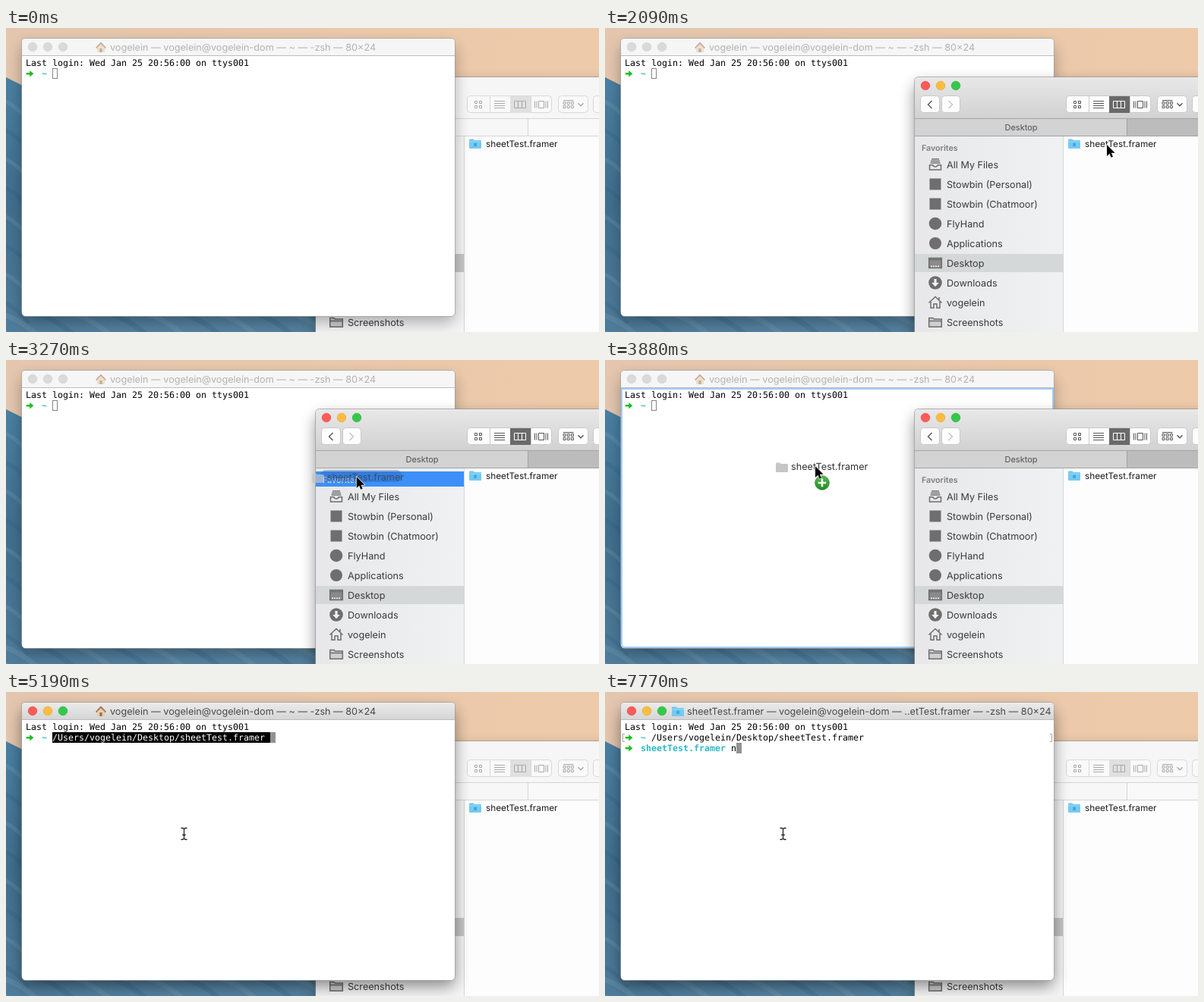
Animation of 781 by 401 pixels, one loop 8000 ms. Source, as an HTML page:

```html
<!DOCTYPE html>
<html lang="en">
<head>
<meta charset="utf-8">
<title>Drag a folder into the terminal</title>
<style>
html, body { margin: 0; width: 100%; height: 100%; overflow: hidden; background: #e8caaf; }
svg { display: block; width: 100vw; height: 100vh; }
text { font-family: Inter, Roboto, sans-serif; font-size: 12.65px; white-space: pre; text-rendering: geometricPrecision; }
.mono { font-family: "DejaVu Sans Mono", "Liberation Mono", monospace; font-size: 11.63px; }
.bold { font-weight: 700; }
.file { font-size: 11.8px; fill: #1c1c1c; }
.shadow { opacity: .3; }
.on > .shadow { opacity: .44; }

#term .bar { fill: #f6f6f6; }
#term.on .bar { fill: url(#barOn); }
#term .title { fill: #b2b2b2; }
#term.on .title { fill: #484848; }
#term .icon { opacity: .55; }
#term.on .icon { opacity: 1; }
#term .light { fill: #dadada; stroke: #cbcbcb; }
.light { stroke-width: .6; }
#term.on .red, #finder .red { fill: #fc5b57; stroke: #e24640; }
#term.on .yellow, #finder .yellow { fill: #fdbd3f; stroke: #dfa023; }
#term.on .green, #finder .green { fill: #34c84a; stroke: #1dad2c; }

#finder .bar { fill: #f6f6f6; }
#finder.on .bar { fill: url(#toolOn); }
#finder .tab { fill: #f7f7f7; }
#finder.on .tab { fill: #d3d3d3; }
#finder .tab2 { fill: #f9f9f9; }
#finder.on .tab2 { fill: #bcbcbc; }
#finder .rule { stroke: #d4d4d4; }
#finder.on .rule { stroke: #a3a3a3; }
#finder .side { fill: #f4f4f4; }
#finder.on .side { fill: url(#sideOn); }
#finder .picked { fill: #c6c6c6; }
#finder.on .picked { fill: #d5d8d8; }
#finder .btn { fill: #f9f9f9; stroke: #d9d9d9; }
#finder.on .btn { fill: #fdfdfd; stroke: #c9c9c9; }
#finder .seg { fill: #e0e0e0; }
#finder.on .seg { fill: #6a6a6a; }
#finder .tool { stroke: #a9a9a9; }
#finder.on .tool { stroke: #555; }
#finder.on .seg + .tool { stroke: #fff; }
.tool, .line { fill: none; }
.side-text { fill: #3a3a3a; }
.line { stroke: #6e6e6e; stroke-width: 1.5; }
.solid { fill: #6e6e6e; }
</style>
</head>
<body>
<svg id="stage" viewBox="0 0 781 401" xmlns="http://www.w3.org/2000/svg">
  <defs>
    <linearGradient id="sky" x2="1"><stop stop-color="#e3c6ae"/><stop offset="1" stop-color="#edcaa9"/></linearGradient>
    <linearGradient id="hill" x2=".5" y2="1"><stop stop-color="#4a80a2"/><stop offset=".4" stop-color="#416f8e"/><stop offset="1" stop-color="#5582a0"/></linearGradient>
    <linearGradient id="barOn" x2="0" y2="1"><stop stop-color="#ebebeb"/><stop offset="1" stop-color="#d4d4d4"/></linearGradient>
    <linearGradient id="toolOn" x2="0" y2="1"><stop stop-color="#e9e8e9"/><stop offset="1" stop-color="#d2d1d2"/></linearGradient>
    <linearGradient id="sideOn"><stop stop-color="#e8e8ea"/><stop offset="1" stop-color="#eff1f2"/></linearGradient>
    <linearGradient id="badgeFill" x2="0" y2="1"><stop stop-color="#58bd52"/><stop offset="1" stop-color="#1c8f1e"/></linearGradient>
    <filter id="blur" x="-20%" y="-20%" width="140%" height="140%"><feGaussianBlur stdDeviation="10"/></filter>
  </defs>
  <g id="wall"></g>
  <g id="windows"><g id="finder"></g><g id="term"></g></g>
  <g id="drag"></g>
  <g id="badge"></g>
  <path id="arrow" d="M1 1V16L4.4 12.8 6.6 17.8 9 16.8 6.8 11.8H11.6Z" fill="#000" stroke="#fff" stroke-width="1.4" stroke-linejoin="round" paint-order="stroke"/>
  <g id="beam" transform="translate(234.5 187)" fill="none" stroke-linecap="round"></g>
</svg>
<script>
const LOOP = 8000;
const USER = 'vogelein', HOST = USER + '@' + USER + '-dom';
const FILE = 'sheetTest.framer';
const PATH = `/Users/${USER}/Desktop/${FILE}`;
const $ = id => document.getElementById(id);

const rect = (x, y, w, h, attrs = '') => `<rect x="${x}" y="${y}" width="${w}" height="${h}" ${attrs}/>`;
const path = (d, attrs = '') => `<path d="${d}" ${attrs}/>`;
const circle = (x, y, r, attrs = '') => `<circle cx="${x}" cy="${y}" r="${r}" ${attrs}/>`;
const text = (x, y, s, attrs = '') => `<text x="${x}" y="${y}" ${attrs}>${s}</text>`;
const at = (x, y, s) => `<g transform="translate(${x} ${y})">${s}</g>`;
const lights = (x, y) => ['red', 'yellow', 'green'].map((c, i) => circle(x + 20 * i, y, 5.8, `class="light ${c}"`)).join('');
const folder = (x, y, fill, mark = '') => at(x, y,
  path('M0 1.5Q0 .5 1 .5H5.5L7 2H15Q16 2 16 3V12Q16 13 15 13H1Q0 13 0 12Z', `fill="${fill}"`) + mark);
const blueFolder = (x, y) => folder(x, y, '#74caf1', path('M0 4H16', 'stroke="#93d9f7"') + rect(6.3, 5.6, 3.6, 4.4, 'fill="#41a5dc"'));

// Terminal grid: 7 by 14 px cells
const colX = c => 26 + 7 * c;
const rowY = r => 39 + 14 * r;
const mono = (c, r, s, fill = '#000', cls = '') => text(colX(c), rowY(r) + 11, s, `class="mono ${cls}" fill="${fill}"`);
const GREEN = '#22bd22', CYAN = '#2fb9c8';
const prompt = (r, dir) => at(26, rowY(r) + 7.2,
  path('M.8 -1.2H5.2V-4.2L10.4 0 5.2 4.2V1.2H.8Z', `fill="${GREEN}"`)) + mono(3, r, dir, CYAN, 'bold');

function drawWall() {
  let s = rect(0, 0, 781, 401, 'fill="url(#sky)"');
  s += path('M0 65L24 77 90 120 420 300V401H0Z', 'fill="url(#hill)"');
  for (let i = 0; i < 9; i++) {
    const y = 95 + 38 * i, tone = i % 2 ? '#2d5d80' : '#7ba2b8';
    s += path(`M-5 ${y}Q12 ${y + 6} 30 ${y + 28}`, `fill="none" stroke="${tone}" stroke-width="5" opacity=".25"`);
    s += path(`M${i * 48 - 10} 376Q${i * 48 + 18} 384 ${i * 48 + 40} 404`, `fill="none" stroke="${tone}" stroke-width="7" opacity=".25"`);
  }
  $('wall').innerHTML = s;
}

function drawTerm() {
  const house = path('M118 26L125 18.5 132 26 130.5 27.2 125 21.5 119.5 27.2Z', 'fill="#a8694a"')
    + path('M120 26L125 21.3 130 26V32H120Z', 'fill="#e2cfae"') + rect(123.4, 27, 3.2, 5, 'fill="#9a7048"');
  const box = 'M21 37V19Q21 14 26 14H586Q591 14 591 19V37Z';
  $('term').innerHTML =
    rect(21, 24, 570, 364, 'rx="8" class="shadow" filter="url(#blur)"')
    + rect(20.5, 13.5, 571, 367, 'rx="5.5" fill="#fff" stroke="#000" stroke-opacity=".24"')
    + path(box, 'class="bar"') + path('M21 36.5H591', 'stroke="#bcbcbc"')
    + lights(35, 25)
    + `<g id="homeTitle"><g class="icon">${house}</g>${text(137, 30, `${USER} — ${HOST} — ~ — -zsh — 80×24`, 'class="title"')}</g>`
    + `<g id="dirTitle"><g class="icon">${blueFolder(88, 19)}</g>${text(108, 30, `${FILE} — ${HOST} — ..etTest.framer — -zsh — 80×24`, 'class="title"')}</g>`
    + mono(0, 0, 'Last login: Wed Jan 25 20:56:00 on ttys001') + prompt(1, '~')
    + `<g id="pasted">${rect(61, 53, 287, 14)}${mono(5, 1, PATH, '#fff')}</g>`
    + `<g id="ran">${mono(5, 1, PATH)}${path('M26 55.5H23.5V65.5H26M586 55.5H588.5V65.5H586', 'fill="none" stroke="#a5a5a5"')}</g>`
    + `<g id="block">${rect(.5, .5, 6, 13)}</g>`
    + `<g id="next">${prompt(2, FILE)}</g><g id="typed">${mono(20, 2, 'n')}</g>`
    + path('M22 38H590V375Q590 379 586 379H26Q22 379 22 375Z', 'id="dropRing" fill="none" stroke="#a3ccf6" stroke-width="2"');
}

const icons = [
  path('M-5 -7H5M-6 -4.5H6M-6.5 -2H6.5', 'class="line"') + path('M-7.5 .8H-3.2Q-2.5 3 0 3T3.2 .8H7.5V7H-7.5Z', 'class="line"'),
  rect(-7.5, -7.5, 15, 15, 'class="solid"'),
  rect(-7.5, -7.5, 15, 15, 'class="solid"'),
  circle(0, 0, 8.3, 'class="solid"'),
  circle(0, 0, 8, 'class="solid"'),
  rect(-8.3, -6.5, 16.6, 13, 'class="line" style="fill:#8a8a8a"') + path('M-8 -4.5H8', 'class="line"') + path('M-6 4.4H6', 'stroke="#eee" stroke-width="1.6" stroke-dasharray="2 1"'),
  circle(0, 0, 8.8, 'class="solid"') + path('M-1.6 -5H1.6V0H4.8L0 5.2 -4.8 0H-1.6Z', 'fill="#f2f2f2"'),
  path('M-8.5 .5L0 -7.5 8.5 .5M-6 -1V7.2H-2V2H2V7.2H6V-1M5 -7V-3.5', 'class="line"'),
  path('M-8.3 -5.5H-3L-1.5 -4H8.3V6.3H-8.3ZM-8.3 -1.5H8.3', 'class="line" style="fill:#cfcfcf"')
];
const places = ['All My Files', 'Stowbin (Personal)', 'Stowbin (Chatmoor)', 'FlyHand', 'Applications', 'Desktop', 'Downloads', USER, 'Screenshots'];

function drawFinder() {
  const tool = (x, d, w = 1) => at(x, 101, path(d, `class="tool" stroke-width="${w}"`));
  const cell = (x, y, n) => `M${x} ${y}h${n}v${n}h-${n}Z`;
  const grid = [-4.5, 1.5].map(x => cell(x, -4.5, 3) + cell(x, 1.5, 3)).join('');
  const small = [-7, -1.8, 3.4].map(x => cell(x, -3.5, 3) + cell(x, 1.5, 3)).join('') + 'M-7 -5.5H6.5';
  const button = (x, w) => rect(x + .5, 89.5, w, 22, 'rx="4" class="btn"');
  let s = rect(408, 74, 480, 420, 'rx="8" class="shadow" filter="url(#blur)"')
    + path('M407.5 420V70Q407.5 64.5 413 64.5H800V420Z', 'fill="#fdfdfd" stroke="#000" stroke-opacity=".28"')
    + path('M408 120V70Q408 65 413 65H781V120Z', 'class="bar"')
    + lights(422, 76)
    + button(415, 25) + button(443, 24) + button(607, 111) + button(727, 39) + button(773, 30)
    + tool(428, 'M2.5 -5L-2.5 0 2.5 5', 1.4)
    + path('M452.5 96L457.5 101 452.5 106', 'fill="none" stroke="#c4c4c4" stroke-width="1.4"')
    + path('M637.5 90V112M691.5 90V112', 'class="btn"')
    + tool(622, grid) + tool(650, 'M-7 -4.5H7M-7 -1.5H7M-7 1.5H7M-7 4.5H7')
    + `<g>${rect(664, 90, 27, 22, 'class="seg"')}${path('M669.5 96.5H684.5V105.5H669.5ZM674.5 96.5V105.5M679.5 96.5V105.5', 'class="tool"')}</g>`
    + tool(705, 'M-3.5 -4.5H3.5V4.5H-3.5ZM-6 -4.5V4.5M-8.5 -4.5V4.5M6 -4.5V4.5M8.5 -4.5V4.5')
    + tool(741, small) + tool(757, 'M-3.5 -1.8L0 1.8 3.5 -1.8', 1.4)
    + rect(408, 120, 279, 22, 'class="tab"') + rect(688, 120, 93, 22, 'class="tab2"')
    + path('M408 119.5H781M408 142.5H781M687.5 120V142', 'class="rule"')
    + text(548, 135, 'Desktop', 'text-anchor="middle" fill="#505050" style="font-size:11px"')
    + rect(408, 143, 195, 258, 'class="side"') + path('M603.5 143V401', 'stroke="#d6d6d6"')
    + rect(408, 298, 195, 24, 'class="picked"')
    + rect(408, 147, 195, 20, 'id="hover" fill="#3c90f8"')
    + text(417, 162, 'Favorites', 'id="heading" font-weight="600" style="font-size:10.7px"');
  places.forEach((name, i) => {
    const y = 180 + 26 * i;
    s += at(435, y, icons[i]) + text(450, y + 5, name, 'class="side-text"');
  });
  s += blueFolder(610, 146) + text(632, 157, FILE, 'class="file"');
  $('finder').innerHTML = s;
}

function drawPointer() {
  $('drag').innerHTML = rect(-40, -8, 108, 16, 'id="pill" rx="8" fill="#2a5fb0" opacity=".55"')
    + folder(-51, -4, '#c6c6c6') + text(-31, 6, FILE, 'fill="#333"');
  $('badge').innerHTML = circle(10, 23, 9.3, 'fill="url(#badgeFill)" stroke="#2a7f2a" stroke-width=".8"')
    + path('M10 17.8V28.2M4.8 23H15.2', 'stroke="#fff" stroke-width="2.4"');
  const d = 'M-3.5 -7.5H-1.5L0 -6.3 1.5 -7.5H3.5M0 -6.3V6.3M-3.5 7.5H-1.5L0 6.3 1.5 7.5H3.5M-1.8 1.5H1.8';
  $('beam').innerHTML = path(d, 'stroke="#fff" stroke-width="3"') + path(d, 'stroke="#222" stroke-width="1.3"');
}

// Pointer legs: first step, last step, step count, target, easing power
const legs = [
  [1160, 1270, 3, 674, 193, 1],
  [1450, 2090, 11, 660, 153, 2],
  [2740, 3500, 14, 381, 153, 1],
  [3560, 3880, 6, 276, 139, 2],
  [3940, 4170, 4, 276, 141, 1],
  [4710, 4830, 3, 233, 186, 1]
];
function pointer(t) {
  let x = 664, y = 295;
  for (const [a, b, n, tx, ty, pow] of legs) {
    if (t < a) break;
    const k = Math.min(n, Math.floor((t - a) / ((b - a) / (n - 1)) + 1.001));
    const p = 1 - (1 - k / n) ** pow;
    x += (tx - x) * p;
    y += (ty - y) * p;
  }
  return [x, y];
}

const show = (id, on) => $(id).style.display = on ? '' : 'none';
const move = (id, x, y) => $(id).setAttribute('transform', `translate(${x} ${y})`);

const RAISE = 840, PICK = 2740, DROP = 4000, CLICK = 5070, BEAM = 5190, ENTER = 5760, READY = 5850, TYPE = 7770;

function render(t) {
  const finderUp = t >= RAISE && t < CLICK, termOn = t >= CLICK;
  $('finder').classList.toggle('on', finderUp);
  $('term').classList.toggle('on', termOn);
  const top = $(finderUp ? 'finder' : 'term');
  if ($('windows').lastElementChild !== top) $('windows').appendChild(top);

  const [x, y] = pointer(t);
  const dragging = t >= PICK && t < DROP;
  const overSide = dragging && x > 408 && x < 603;
  const overTerm = dragging && x <= 408;
  show('arrow', t >= RAISE && t < BEAM);
  show('beam', t >= BEAM);
  move('arrow', x, y);
  move('badge', x, y);
  show('badge', overTerm);
  show('dropRing', overTerm);
  show('hover', overSide);
  show('pill', overSide);
  $('heading').setAttribute('fill', overSide ? '#d5e6fd' : '#7c7c7c');
  // The dragged item runs slightly ahead of the pointer.
  show('drag', dragging);
  move('drag', x - (t < 3560 ? 7 : 0), y);
  $('drag').setAttribute('opacity', overTerm ? 1 : .7);

  show('homeTitle', t < READY);
  show('dirTitle', t >= READY);
  show('pasted', t >= DROP && t < ENTER);
  show('ran', t >= ENTER);
  show('next', t >= READY);
  show('typed', t >= TYPE);

  const [col, row] = t < DROP ? [5, 1] : t < ENTER ? [46, 1] : t < READY ? [0, 2] : [t < TYPE ? 20 : 21, 2];
  move('block', colX(col), rowY(row));
  $('block').setAttribute('fill', termOn ? '#929292' : '#fff');
  $('block').setAttribute('stroke', termOn ? '#929292' : '#858585');
}

drawWall();
drawTerm();
drawFinder();
drawPointer();
const start = performance.now();
function tick() {
  render((performance.now() - start) % LOOP);
  requestAnimationFrame(tick);
}
tick();
</script>
</body>
</html>
```
